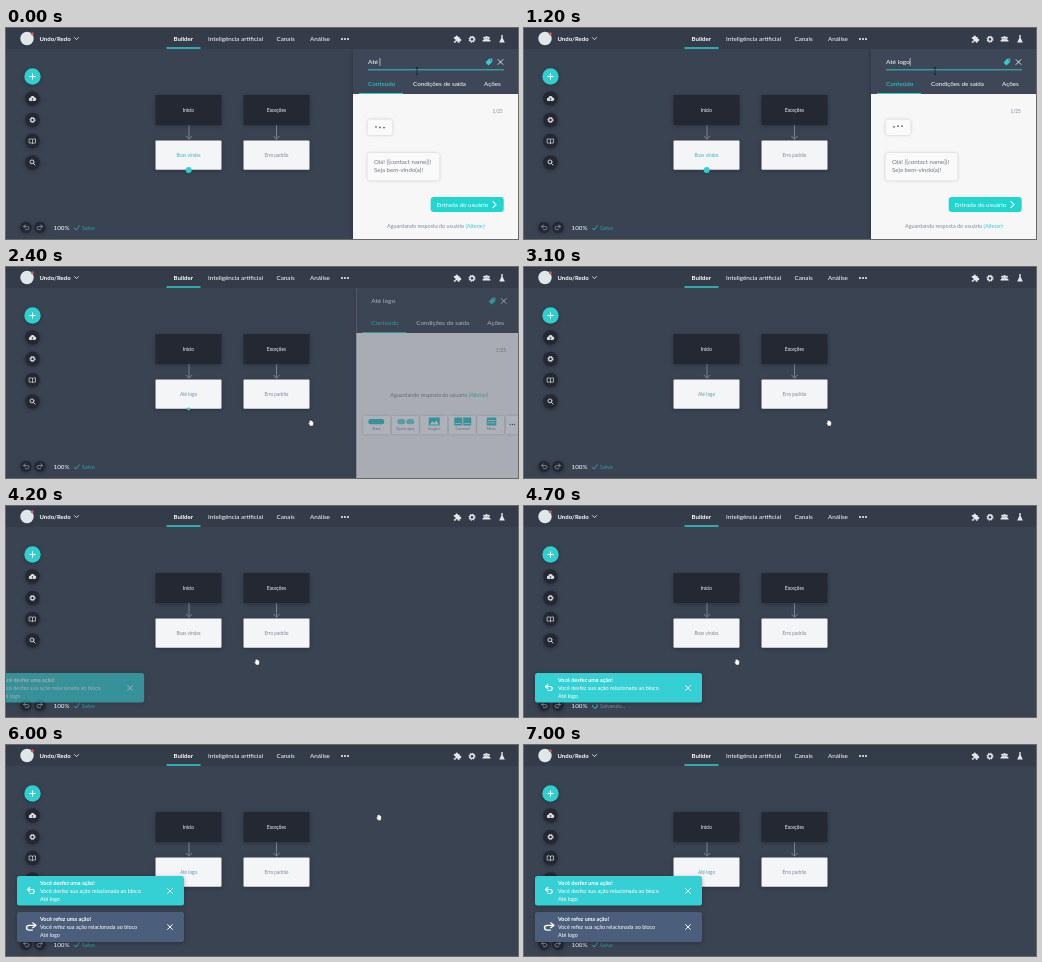
Write an HTML page that moves like this. It is 512x211 px and loops after 7.1 s.

```html
<!DOCTYPE html>
<html lang="pt">
<head>
<meta charset="utf-8">
<title>Undo/Redo</title>
<style>
  html, body { margin: 0; height: 100%; overflow: hidden; background: #3a4352; }
  svg { display: block; width: 100vw; height: 100vh; }
  text { font: 6.3px Lato, sans-serif; fill: #fff; white-space: pre; }
  .bold { font-weight: 700; }
  .mid { text-anchor: middle; }
  .small { font-size: 4.7px; }
  .tiny { font-size: 3.6px; fill: #7b8594; }
  .body { font-size: 5.45px; }
  .bubble { font-size: 6.1px; fill: #6d7686; }
  .grey { fill: #7d8a9c; }
  .teal { fill: #2fcfcf; }
  .dark { fill: #232833; }
  .white { fill: #fff; }
  .line { fill: none; stroke: #fff; stroke-linecap: round; stroke-linejoin: round; }
  .tealLine { fill: none; stroke: #2fcfcf; }
  .shadow { filter: drop-shadow(0 1px 2px #0004); }
  .soft { filter: drop-shadow(0 0 1.5px #0003); }
</style>
</head>
<body>
<svg viewBox="0 0 512 211" preserveAspectRatio="none">
  <defs>
    <g id="gear">
      <circle r="2.3" fill="none" stroke="#fff" stroke-width="1.6"/>
      <circle r="3.3" fill="none" stroke="#fff" stroke-width="1.2" stroke-dasharray="1.3 1.29"/>
    </g>
    <path id="close" class="line" d="M-2.4-2.4 2.4 2.4M2.4-2.4-2.4 2.4"/>
    <path id="back" class="line" d="M-1.3-3-3.5-1-1.3 1M-3.5-1H1.2a2 2 0 0 1 0 4H-1"/>
    <path id="arrow" fill="none" stroke="#7b8493" d="M0 97V111M-3 108 0 111.3 3 108"/>
  </defs>

  <rect width="512" height="211" fill="#3a4352"/>

  <!-- flow -->
  <use href="#arrow" x="183"/>
  <use href="#arrow" x="270.5"/>
  <g class="shadow">
    <path class="dark" d="M149.5 67h66v30h-66zM237.5 67h66v30h-66z"/>
    <g fill="#f4f5f6">
      <rect x="149.5" y="112.5" width="66" height="29.2" rx="1"/>
      <rect x="237.5" y="112.5" width="66" height="29.2" rx="1"/>
    </g>
  </g>
  <text class="small mid" x="182.5" y="83.7">Início</text>
  <text class="small mid" x="270.5" y="83.7">Exceções</text>
  <text id="block" class="small mid" x="182.5" y="128.7"></text>
  <text class="small mid grey" x="270.5" y="128.7">Erro padrão</text>
  <circle id="port" class="teal" cx="182.7" cy="142"/>

  <!-- left tools -->
  <g class="shadow">
    <circle class="teal" cx="26.5" cy="48.5" r="8.2"/>
    <g class="dark">
      <circle cx="26.5" cy="70.5" r="7.3"/><circle cx="26.5" cy="92" r="7.3"/>
      <circle cx="26.5" cy="113" r="7.3"/><circle cx="26.5" cy="134.5" r="7.3"/>
      <circle cx="20" cy="199.5" r="5.8"/><circle cx="34" cy="199.5" r="5.8"/>
    </g>
  </g>
  <path class="line" d="M23.9 48.5h5.2M26.5 45.9v5.2" stroke-width="1"/>
  <g opacity=".85">
    <g transform="translate(26.5 70.5) scale(.8)">
      <path class="white" d="M-2.5 3a2 2 0 0 1-.2-4 2.8 2.8 0 0 1 5.3-.4A2.2 2.2 0 0 1 2.500 3z"/>
      <path d="M0 3V0M-1.2 1 0-.2 1.2 1" fill="none" stroke="#232833" stroke-width=".7"/>
    </g>
    <use href="#gear" transform="translate(26.5 92) scale(.8)"/>
    <path class="line" transform="translate(26.5 113) scale(.85)" d="M0-2V3M-3.500-2.400h2.500l1 .6 1-.6h2.500v4.800H1l-1 .6-1-.6h-2.500z" stroke-width=".8"/>
    <path class="line" transform="translate(26.5 134.5) scale(.85)" d="M1.100 1.100 3 3M1.700-.7a2.300 2.300 0 1 1-4.600 0 2.300 2.300 0 0 1 4.600 0" stroke-width="1.1"/>
  </g>

  <!-- bottom bar -->
  <g opacity=".6" stroke-width=".8">
    <use href="#back" transform="translate(20.400 199.300) scale(.8)"/>
    <use href="#back" transform="translate(33.600 199.300) scale(-.8 .8)"/>
  </g>
  <text x="47.5" y="201.8">100%</text>
  <g id="saved" opacity=".65">
    <path class="tealLine" d="M68 199.8 70 202 73.5 197.5"/>
    <text class="body teal" x="76" y="201.6">Salvo</text>
  </g>
  <g id="saving">
    <circle id="spinner" class="tealLine" cx="71" cy="199.8" r="2.3" stroke-width=".9" stroke-dasharray="9 5.5"/>
    <text class="body grey" x="76" y="201.6">Salvando...</text>
  </g>

  <!-- side panel -->
  <g id="panel">
    <rect class="shadow" x="347" y="21" width="170" height="195" fill="#f7f7f8"/>
    <rect x="347" y="21" width="170" height="45" fill="#3e4757"/>
    <text id="title" x="362" y="36.4" style="font-size:6.5px"></text>
    <path id="titleLine" class="tealLine" d="M362 41.8H498" stroke-width=".9"/>
    <path id="caret" class="line" stroke-width=".6" d="M0 30.5v7"/>
    <path class="teal" d="M479.5 34.5 483 30.8l3.4-.3-.3 3.4-3.6 3.5z"/>
    <circle cx="484.7" cy="32.2" r=".6" fill="#3e4757"/>
    <use href="#close" x="494.5" y="34" stroke-width=".8"/>
    <text class="teal" x="362" y="58.2">Conteúdo</text>
    <text x="407" y="58.2">Condições de saída</text>
    <text x="478" y="58.2">Ações</text>
    <path class="tealLine" d="M353 65.5h44" stroke-width="1.2"/>
    <text class="small grey" x="486.5" y="84.5">1/25</text>
    <g id="messages">
      <g class="soft" fill="#fafafb">
        <rect x="361.5" y="91.5" width="25" height="15.5" rx="3"/>
        <rect x="361.5" y="125" width="72" height="27.5" rx="3"/>
      </g>
      <g id="dots" fill="#566173">
        <circle cx="370" r=".9"/><circle cx="374" r=".9"/><circle cx="378" r=".9"/>
      </g>
      <text class="bubble" x="368" y="136.2">Olá! {{contact name}}!</text>
      <text class="bubble" x="368" y="144.2">Seja bem-vindo(a)!</text>
      <rect x="424.7" y="169" width="73" height="15" rx="3" fill="#20d6cf"/>
      <text x="430.5" y="178.7">Entrada do usuário</text>
      <path class="line" d="M487 173.700 490 176.700 487 179.700" stroke-width="1.2"/>
    </g>
    <text id="waiting" class="body grey" x="381">Aguardando resposta do usuário <tspan class="teal">(Alterar)</tspan></text>
    <g id="menu">
      <path class="white soft" d="M354 149h27v18h-27zM382.5 149h27v18h-27zM411 149h27v18h-27zM439.5 149h27v18h-27zM468 149h27v18h-27zM496.5 149h20v18h-20z"/>
      <g class="teal">
        <rect x="359" y="152" width="16" height="5.2" rx="2.5"/>
        <rect x="388" y="152" width="8" height="5.2" rx="2.5" opacity=".7"/>
        <rect x="397" y="152" width="8" height="5.2" rx="2.5" opacity=".7"/>
        <rect x="419.5" y="150.5" width="11" height="8"/>
        <rect x="445" y="150.5" width="8" height="8"/>
        <rect x="454" y="150.5" width="8" height="8"/>
        <rect x="477.5" y="150.5" width="9.5" height="8"/>
      </g>
      <path class="white" d="M420.5 157.5l2.5-3 2 1.6 2-2.6 2.5 4zM446 156h6v.8h-6zM455 156h6v.8h-6zM478.5 153h7.5v.7h-7.5zM478.5 155.5h7.5v.7h-7.5z"/>
      <g class="mid">
        <text class="tiny" x="367" y="163.4">Texto</text>
        <text class="tiny" x="396" y="163.4">Quick reply</text>
        <text class="tiny" x="425" y="163.4">Imagem</text>
        <text class="tiny" x="453.5" y="163.4">Carrossel</text>
        <text class="tiny" x="482" y="163.4">Menu</text>
      </g>
      <path stroke="#3e4757" stroke-width="1.3" stroke-linecap="round" stroke-dasharray="0 2.2" d="M501 157.500h4.500"/>
    </g>
  </g>

  <!-- top bar -->
  <rect width="512" height="21" fill="#343c4a"/>
  <circle cx="21" cy="10.5" r="6.7" fill="#dfe7e8"/>
  <circle cx="26.3" cy="5.700" r="1.5" fill="#e0525f"/>
  <text class="bold" x="33.5" y="12.6" style="font-size:6px">Undo/Redo</text>
  <path class="line" d="M68.500 9.600 70.500 11.600 72.500 9.600" stroke-width=".8"/>
  <text class="bold" x="167.5" y="12.6" style="font-size:6.1px">Builder</text>
  <path class="tealLine" d="M160.5 20h34" stroke-width="1.3"/>
  <text x="202" y="12.6">Inteligência artificial</text>
  <text x="270.5" y="12.6">Canais</text>
  <text x="304" y="12.6">Análise</text>
  <path class="line" stroke-width="1.9" stroke-dasharray="0 3" d="M336 11h6.1"/>
  <g opacity=".88">
    <path class="white" transform="translate(451 11.300) scale(.9)" d="M-3.500-2.500h2a1.300 1.300 0 1 1 2.400 0h2v2a1.300 1.300 0 1 1 0 2.400v2h-2a1.300 1.300 0 1 0-2.400 0h-2v-2a1.300 1.300 0 1 0 0-2.400z"/>
    <use href="#gear" transform="translate(466 11.300) scale(.9)"/>
    <g class="white">
      <circle cx="478.2" cy="9.8" r="1.1"/><circle cx="482.8" cy="9.8" r="1.1"/><circle cx="480.5" cy="9.6" r="1.5"/>
      <path d="M476.500 13.500v-1q2-2 4-1.200 2-.8 4 1.200v1zM495.300 7h1.400v3l2.100 4.600h-5.600l2.100-4.600z"/>
    </g>
  </g>

  <!-- toasts -->
  <g id="undoToast">
    <rect class="shadow" x="11" y="131" width="167" height="29.5" rx="2.5" fill="#35d0d3"/>
    <use href="#back" x="25" y="145.5" stroke-width="1.2"/>
    <text class="bold body" x="34" y="139.9">Você desfez uma ação!</text>
    <text class="body" x="34" y="147.8">Você desfez sua ação relacionada ao bloco</text>
    <text class="body" x="34" y="155.5">Até logo</text>
    <use href="#close" x="164" y="146"/>
  </g>
  <g id="redoToast">
    <rect class="shadow" x="11" y="167" width="167" height="30" rx="2.5" fill="#4b5f7c"/>
    <use href="#back" transform="translate(25 181.5) scale(-1.4 1.2)"/>
    <text class="bold body" x="34" y="175.9">Você refez uma ação!</text>
    <text class="body" x="34" y="183.8">Você refez sua ação relacionada ao bloco</text>
    <text class="body" x="34" y="191.5">Até logo</text>
    <use href="#close" x="164" y="182"/>
  </g>

  <path id="beam" fill="none" stroke="#161a22" stroke-width=".7" d="M-1.2-3.5h2.4M0-3.5v7M-1.2 3.5h2.4"/>
  <path id="hand" fill="#fff" stroke="#222" stroke-width=".4" d="M-.8 3-2.800.3q0-1 1.200-.2L-1.900-2q.4-.9 1 0l0-.6q.5-.8 1.100 0v.3q.6-.7 1.100.2v.5q.7-.5 1.100.3V1L1.900 3z"/>
</svg>
<script>
const LOOP = 7100;
const $ = id => document.getElementById(id);
const show = (id, on) => $(id).style.display = on ? '' : 'none';
const set = (id, name, value) => $(id).setAttribute(name, value);
const clamp = v => Math.min(1, Math.max(0, v));
const within = (t, a, b) => t >= a && t < b;

// pointer path: time, x, y
const path = [[1700, 411, 43], [2100, 305, 156], [3900, 305, 156], [4200, 251, 156],
  [4700, 213, 156], [5500, 213, 156], [6200, 412, 52], [6500, 482, -8]];

function pointerAt(t) {
  const i = path.findIndex(p => p[0] > t);
  if (i <= 0) return path[i ? path.length - 1 : 0].slice(1);
  const [t0, x0, y0] = path[i - 1], [t1, x1, y1] = path[i];
  const p = (t - t0) / (t1 - t0), e = p * p * (3 - 2 * p);
  return [x0 + (x1 - x0) * e, y0 + (y1 - y0) * e];
}

function toast(id, t, start, dy) {
  const p = clamp((t - start) / 400);
  show(id, t >= start);
  set(id, 'transform', `translate(${-161 * (1 - p) ** 2} ${dy})`);
  set(id, 'opacity', p * (1.2 - .2 * p));
}

function draw(t) {
  const editing = t < 2000;
  $('title').textContent = 'Até logo'.slice(0, 4 + Math.min(4, Math.floor(t / 200)));
  show('titleLine', editing);
  show('caret', editing && t % 1000 < 500);
  set('caret', 'transform', `translate(${362.3 + $('title').getComputedTextLength()})`);
  show('messages', editing);
  show('menu', !editing);
  set('waiting', 'y', editing ? 200.3 : 130.3);
  [...$('dots').children].forEach((dot, i) =>
    dot.setAttribute('cy', 98.8 - .8 * Math.sin(t / 800 * 2 * Math.PI - i)));

  const closing = clamp((t - 2300) / 300);
  show('panel', closing < 1);
  set('panel', 'transform', `translate(${closing * (3 + closing * 30) * .8 - .8 * closing})`);
  set('panel', 'opacity', 1 - closing * 1.22);

  const renamed = within(t, 2300, 4000) || t >= 5200;
  $('block').textContent = renamed ? 'Até logo' : 'Boas vindas';
  $('block').style.fill = t < 1700 ? '#2fbfc6' : renamed ? '#6597ad' : '#7d8a9c';
  set('port', 'r', 3 * (1 - clamp((t - 2300) / 200)));

  const saving = within(t, 2500, 3000) || within(t, 4300, 4900) || within(t, 5200, 5900);
  show('saving', saving);
  show('saved', !saving);
  set('spinner', 'transform', `rotate(${t * .45} 71 199.8)`);

  toast('undoToast', t, 4000, t < 5200 ? 36 : 0);
  toast('redoToast', t, 5300, 0);

  const at = `translate(${pointerAt(t).join(' ')})`;
  show('beam', t < 1800);
  show('hand', within(t, 1800, 6500));
  set('beam', 'transform', at);
  set('hand', 'transform', at);
}

const start = performance.now();
(function frame() {
  draw((performance.now() - start) % LOOP);
  requestAnimationFrame(frame);
})();
</script>
</body>
</html>
```
